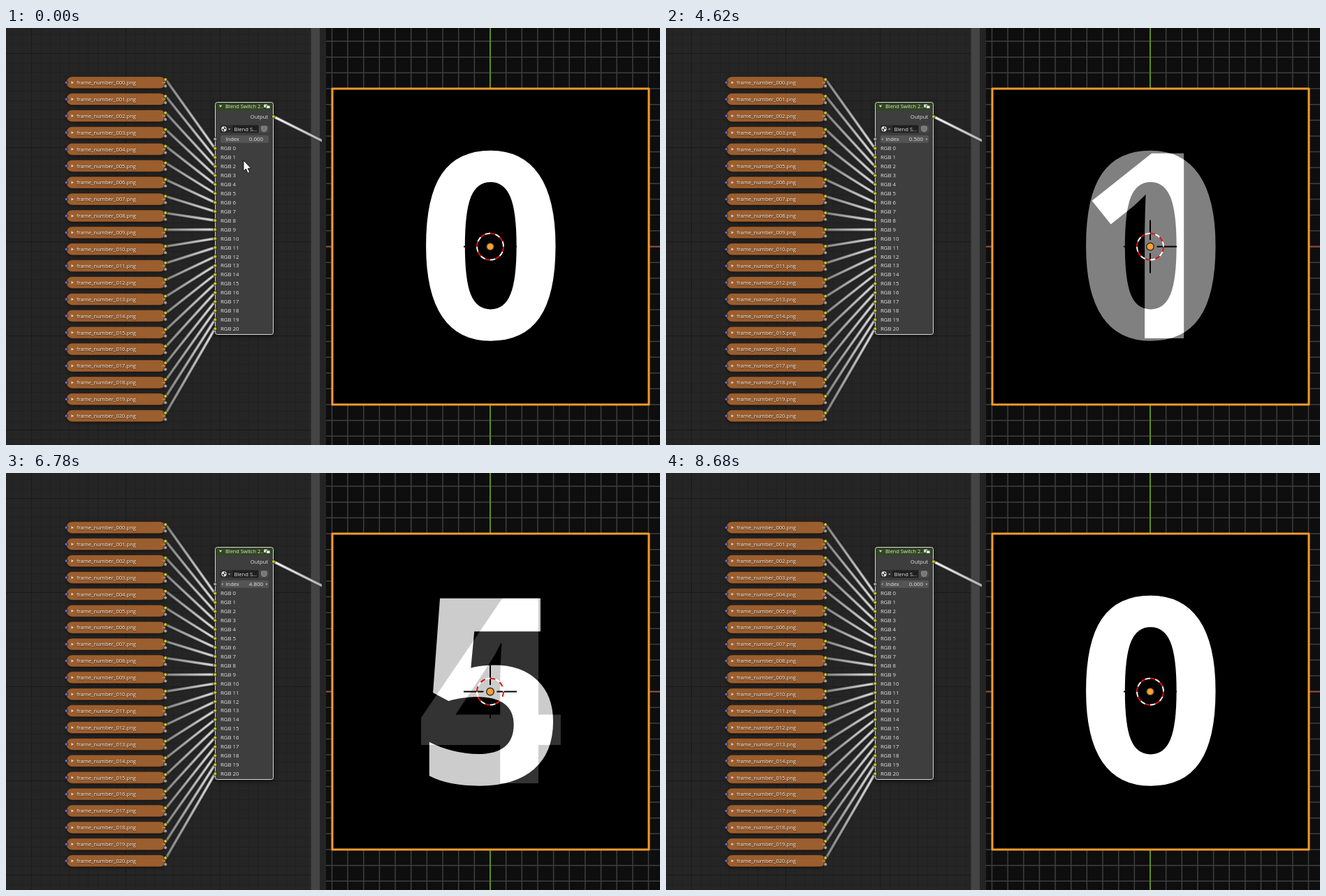
Animation, 936 px wide and 598 px high, one loop 9.47 s. Source, as an HTML page with a canvas:

```html
<!DOCTYPE html>
<html lang="en">
<head>
<meta charset="utf-8">
<title>Blend Switch</title>
<style>
  html, body { margin: 0; width: 100%; height: 100%; overflow: hidden; background: #232323; }
  canvas { display: block; }
</style>
</head>
<body>
<canvas id="stage" width="936" height="598"></canvas>
<script>
const W = 936, H = 598, LOOP = 9470;
const FONT = '"Open Sans", "Noto Sans", sans-serif';
const CENTER = { x: 693, y: 313.5 };
const YELLOW = '#c7c729', GREY = '#a1a1a1', PURPLE = '#6363c7';

const ctx = document.getElementById('stage').getContext('2d');
const backdrop = document.createElement('canvas');
backdrop.width = W;
backdrop.height = H;

function line(c, x1, y1, x2, y2, color, width = 1) {
  c.strokeStyle = color;
  c.lineWidth = width;
  c.beginPath();
  c.moveTo(x1, y1);
  c.lineTo(x2, y2);
  c.stroke();
}

function path(c, points, fill) {
  c.beginPath();
  points.forEach(([x, y]) => c.lineTo(x, y));
  c.closePath();
  c.fillStyle = fill;
  c.fill();
}

function box(c, x, y, w, h, r, fill, stroke) {
  c.beginPath();
  c.roundRect(x, y, w, h, r);
  if (fill) { c.fillStyle = fill; c.fill(); }
  if (stroke) { c.strokeStyle = stroke; c.lineWidth = 1; c.stroke(); }
}

function dot(c, x, y, r, fill, rim, rimWidth = 0.8) {
  c.beginPath();
  c.arc(x, y, r, 0, Math.PI * 2);
  c.fillStyle = fill;
  c.fill();
  if (rim) { c.strokeStyle = rim; c.lineWidth = rimWidth; c.stroke(); }
}

function label(c, text, x, y, size = 7.7, align = 'left', color = '#e4e4e4') {
  c.font = `${size}px ${FONT}`;
  c.textAlign = align;
  c.fillStyle = color;
  c.fillText(text, x, y);
}

function chevron(c, x, y, dx, dy) {
  c.strokeStyle = '#d0d0d0';
  c.lineWidth = 0.9;
  c.beginPath();
  c.moveTo(x - dx - dy, y - dy - dx);
  c.lineTo(x + dx, y + dy);
  c.lineTo(x - dx + dy, y - dy + dx);
  c.stroke();
}

function link(c, x1, y1, x2, y2, from, to) {
  const fade = c.createLinearGradient(x1, y1, x2, y2);
  fade.addColorStop(0, from);
  fade.addColorStop(1, to);
  line(c, x1, y1, x2, y2, 'rgba(0,0,0,0.35)', 6);
  c.globalAlpha = 0.5;
  line(c, x1, y1, x2, y2, fade, 4.4);
  c.globalAlpha = 1;
  line(c, x1, y1, x2, y2, fade, 2.4);
}

const imageY = i => 78.2 + 23.9 * i;
const socketY = i => 172.6 + 12.93 * i;

function drawNodeGrid(c) {
  c.fillStyle = '#252525';
  c.fillRect(0, 0, 458, H);
  for (let i = -3; i < 45; i++) {
    const p = Math.round(36 + 13.5 * i) + 0.5;
    const color = i % 10 === 0 ? '#1a1a1a' : '#202020';
    if (p < 458) line(c, p, 0, p, H, color);
    line(c, 0, p, 458, p, color);
  }
  c.fillStyle = '#444';
  c.fillRect(436.5, 0, 12.5, H);
  c.fillStyle = '#242424';
  c.fillRect(449, 0, 9, H);
}

function drawImageNode(c, i) {
  const y = imageY(i);
  c.save();
  c.shadowColor = 'rgba(0,0,0,0.6)';
  c.shadowBlur = 4;
  c.shadowOffsetY = 1;
  box(c, 86.5, y - 8.5, 142, 17, 8, '#9b5e2e');
  c.restore();
  box(c, 86.5, y - 8.5, 142, 17, 8, null, 'rgba(50,25,8,0.55)');
  path(c, [[93.5, y - 2], [97, y], [93.5, y + 2]], '#e0d5cb');
  c.save();
  c.shadowColor = 'rgba(0,0,0,0.7)';
  c.shadowBlur = 1.5;
  c.shadowOffsetY = 1;
  label(c, `frame_number_${String(i).padStart(3, '0')}.png`, 101, y + 2.8, 7.62, 'left', '#f2f2f2');
  c.restore();
  line(c, 223.5, y, 228, y, '#d8a680', 0.8);
  dot(c, 86.3, y, 2.3, PURPLE, '#191919');
  dot(c, 228.2, y - 4.3, 2.5, YELLOW, '#191919');
  dot(c, 228.2, y + 5, 2.5, GREY, '#191919');
}

function drawSwitchNode(c) {
  c.save();
  c.shadowColor = 'rgba(0,0,0,0.6)';
  c.shadowBlur = 7;
  c.shadowOffsetY = 2;
  box(c, 299.5, 106.5, 83, 333, 3, '#3e3e3e');
  c.restore();
  box(c, 299.5, 106.5, 83, 11.5, [3, 3, 0, 0], '#304620');
  box(c, 299.5, 106.5, 83, 333, 3, null, '#d8d8d8');

  path(c, [[304.8, 110.8], [309.2, 110.8], [307, 114]], '#d0d0d0');
  label(c, 'Blend Switch 2..', 314, 114.6, 7.4);
  box(c, 369, 109.5, 5.5, 4.5, 1, '#d8d8d8');
  box(c, 372.5, 111, 5.5, 4.5, 1, '#f0f0f0', '#444');
  label(c, 'Output', 375, 129.7, 7.6, 'right');

  box(c, 306.5, 139.3, 16.5, 11, [2.5, 0, 0, 2.5], '#2c2c2c');
  dot(c, 312, 144.8, 3.7, '#e4e4e4');
  path(c, [[312, 141.2], [315.5, 144.8], [312, 144.8]], '#333');
  path(c, [[312, 144.8], [312, 148.4], [308.5, 144.8]], '#333');
  chevron(c, 319.7, 145, 0, 0.9);
  box(c, 323.5, 139.3, 38, 11, 0, '#202020');
  label(c, 'Blend S...', 326.5, 147.5, 7.6);
  box(c, 362, 139.3, 14.5, 11, [0, 2.5, 2.5, 0], '#484848');
  box(c, 365.6, 141, 7.6, 7.6, [1, 1, 4, 4], '#777', '#909090');

  dot(c, 299.3, 159.3, 2.5, GREY, '#191919');
  for (let i = 0; i <= 20; i++) {
    dot(c, 299.3, socketY(i), 2.5, YELLOW, '#191919');
    label(c, `RGB ${i}`, 307, socketY(i) + 2.8, 7.8);
  }
}

function drawViewport(c) {
  c.fillStyle = '#0e0e0e';
  c.fillRect(458, 0, W - 458, H);
  c.save();
  c.beginPath();
  c.rect(458, 0, W - 458, H);
  c.clip();
  for (let i = -13; i <= 13; i++) {
    const d = 22.65 * i;
    line(c, CENTER.x + d, 0, CENTER.x + d, H, '#3f3f3f', 1.5);
    line(c, 458, CENTER.y + d, W, CENTER.y + d, '#3f3f3f', 1.5);
  }
  c.restore();
  line(c, 458, CENTER.y, W, CENTER.y, '#964a42', 1.8);
  line(c, CENTER.x, 0, CENTER.x, H, '#638c20', 2);
  c.fillStyle = '#000';
  c.fillRect(467, 87, 453, 453);
  c.strokeStyle = '#f49b2c';
  c.lineWidth = 3;
  c.lineJoin = 'round';
  c.strokeRect(467, 87, 453, 453);
}

function drawBackdrop(c) {
  drawNodeGrid(c);
  for (let i = 0; i <= 20; i++) {
    link(c, 229, imageY(i) - 4, 299, socketY(i), '#858585', '#e2e2e2');
  }
  for (let i = 0; i <= 20; i++) drawImageNode(c, i);
  drawSwitchNode(c);
  c.save();
  c.beginPath();
  c.rect(0, 0, 452, H);
  c.clip();
  link(c, 383, 127, 453, 162, '#ffffff', '#b8b8b8');
  c.restore();
  dot(c, 382.8, 127, 2.5, YELLOW, '#191919');
  drawViewport(c);
}

// Slider drags: [first step, last step, number of steps, value reached]
const DRAGS = [
  [2480, 3110, 10, 1.4], [3180, 3250, 2, 1.5], [3390, 3730, 6, 2],
  [4200, 4620, 7, 0.5], [4690, 4830, 3, 0],
  [5040, 5390, 6, 2.2], [5460, 5960, 8, 4.4], [6030, 6240, 4, 4.9],
  [6780, 6780, 1, 4.8], [6850, 7480, 10, 3.1], [7550, 7690, 3, 2.6],
  [7760, 8540, 12, 0]
];

function indexAt(t) {
  let value = 0;
  for (const [start, end, steps, goal] of DRAGS) {
    if (t < start) break;
    const progress = end > start ? Math.min(1, (t - start) / (end - start)) : 1;
    const done = Math.floor(progress * (steps - 1) + 1e-6) + 1;
    value += (goal - value) * done / steps;
  }
  return Math.round(value * 10) / 10;
}

function drawDigits(value) {
  const lower = Math.floor(value + 1e-6);
  const mix = value - lower;
  ctx.save();
  ctx.globalCompositeOperation = 'lighter';
  ctx.font = `700 371.5px ${FONT}`;
  ctx.textAlign = 'left';
  [[lower, 1 - mix], [lower + 1, mix]].forEach(([digit, weight]) => {
    if (weight < 0.01) return;
    const g = Math.round(255 * weight);
    ctx.fillStyle = `rgb(${g},${g},${g})`;
    ctx.fillText(digit, 587.7, 445);
  });
  ctx.restore();
}

function drawCursor3D() {
  const { x, y } = CENTER;
  for (const s of [-1, 1]) {
    line(ctx, x + 9.5 * s, y, x + 38 * s, y, '#000', 2);
    line(ctx, x, y + 9.5 * s, x, y + 38 * s, '#000', 2);
  }
  const step = Math.PI / 8;
  ctx.lineWidth = 2;
  for (let i = 0; i < 16; i++) {
    ctx.strokeStyle = i % 2 ? '#fff' : '#e01010';
    ctx.beginPath();
    ctx.arc(x, y, 19, i * step, (i + 1) * step);
    ctx.stroke();
  }
  dot(ctx, x, y, 5.3, '#ffa02f', '#2b2b2b', 1.4);
}

function drawSlider(t, value) {
  const hover = t >= 1600, held = t >= 2020;
  box(ctx, 307, 154, 69, 10.8, 2.5, hover && !held ? '#656565' : '#545454');
  label(ctx, 'Index', 314.5, 162.1, 7.5);
  label(ctx, value.toFixed(3), 368, 162.1, 7.9, 'right');
  if (hover) {
    chevron(ctx, 309.8, 159.4, -0.9, 0);
    chevron(ctx, 373, 159.4, 0.9, 0);
  }
}

function drawPointer(x, y) {
  const shape = [[0, 0], [0, 15], [3.5, 12], [6, 18], [8.7, 17], [6.2, 11.3], [10.7, 11.3]];
  path(ctx, shape.map(([dx, dy]) => [x + dx, y + dy]), '#fff');
  ctx.strokeStyle = '#000';
  ctx.lineWidth = 0.8;
  ctx.stroke();
}

function render(t) {
  const value = indexAt(t);
  ctx.drawImage(backdrop, 0, 0);
  drawDigits(value);
  drawCursor3D();
  drawSlider(t, value);
  if (t < 1600) drawPointer(340, t < 1470 ? 190 : 173);
}

drawBackdrop(backdrop.getContext('2d'));
const began = performance.now();
function tick() {
  render((performance.now() - began) % LOOP);
  requestAnimationFrame(tick);
}
tick();
</script>
</body>
</html>
```
